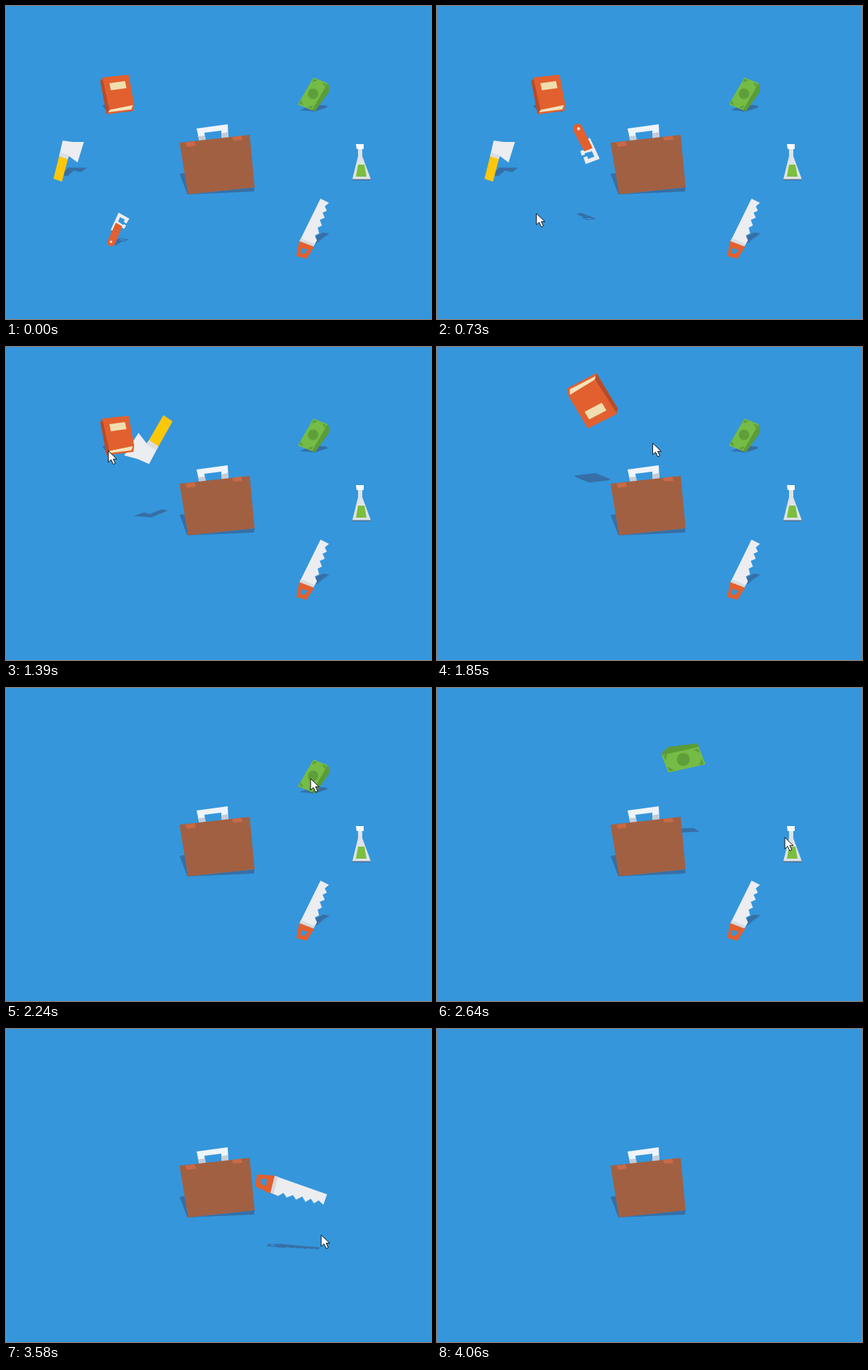
Recreate the animation shown at these times as an HTML page with a canvas. Size 600 px wide and 442 px high, loop 4390 ms.

```html
<!DOCTYPE html>
<html lang="en">
<head>
<meta charset="utf-8">
<title>Packing a briefcase</title>
<style>
html, body { margin: 0; height: 100%; overflow: hidden; background: #3596db; }
canvas { display: block; }
</style>
</head>
<body>
<canvas width="600" height="442"></canvas>
<script>
const ctx = document.querySelector('canvas').getContext('2d');
const LOOP = 4390, FLIGHT = 610, LIFT = 95, GROW = 0.24;
const SHADOW = '#366fa6', WHITE = '#ecedf1', ORANGE = '#e2602f', GREEN = '#75bc46';

const fill = (color, path) => ({ color, path: new Path2D(path) });
const line = (color, width, path) => ({ color, width, path: new Path2D(path) });

// at: centre at rest, ground: shadow centre at rest, tip: where the pointer clicks
const items = [
  { start: 510, at: [157.5, 316], ground: [159, 333], tip: [147, 303], parts: [
    line(WHITE, 4.5, 'M150 317L160 295 171 301 168 306'),
    line(WHITE, 4, 'M157 306L166 312 168 309'),
    fill(ORANGE, 'M155 306L164 311 154 336Q150 342 145 338Q142 335 144 331Z'),
    fill('#f3d9cf', 'M146.5 333a1.8 1.8 0 1 0 3.6 0a1.8 1.8 0 1 0 -3.6 0Z') ] },
  { start: 1060, at: [88, 219], ground: [95, 234], tip: [86, 212], parts: [
    fill('#fdc70c', 'M75 212L88 214 79 248 67 244Z'),
    fill(WHITE, 'M80 190L94 192 110 192 101 221 89 212 87 216 75 212Z'),
    fill('#dcdee4', 'M77 207L89 211 87 216 75 212Z') ] },
  { start: 1580, at: [157, 125], ground: [157, 144.5], tip: [145, 146], parts: [
    fill(ORANGE, 'M145 145L181 138 180 148 142 153Z'),
    fill('#f3e3bb', 'M147 146.5L179 140 177 146 144 150Z'),
    fill('#b94b27', 'M133 106L137 102 146 146 142 153Z'),
    fill(ORANGE, 'M136 101L173 97 181 139 146 146Z'),
    fill('#f0deae', 'M146 109L168 106 170 116 148 119Z') ] },
  { start: 2256, at: [434, 125], ground: [434, 144], tip: [430, 128], parts: [
    fill('#5c9c38', 'M452 108L456 112 456 121 436 149 430 146Z'),
    fill(GREEN, 'M434 101L454 109 432 147 412 139Z'),
    fill('#5f9f3a', 'M434 103L440 105 432 108Z M452 110L451 115 446 108Z M414 138L416 133 420 140Z M431 145L426 143 434 140Z'),
    fill('#5f9f3a', 'M426 124a7.5 7.5 0 1 0 15 0a7.5 7.5 0 1 0 -15 0Z') ] },
  { start: 2850, at: [502, 221], ground: [502, 241], tip: [491, 211], parts: [
    fill('#52708f', 'M489 243H515V246H489Z'),
    fill('#dfe3e8', 'M497 200H503V212L515 244.5H489L497 212Z'),
    fill('#fafbfc', 'M494 195H505V202H495Z'),
    fill('#7cbe3e', 'M497 224H506L509 241H494Z') ] },
  { start: 3440, at: [433, 315], ground: [438, 329], tip: [445, 291], parts: [
    fill(WHITE, 'M444 272L456 278 450 283 453 289 447 292 450 299 443 302 446 310 440 313 442 321 436 324 439 331 433 341 414 333Z'),
    fill('#d8dade', 'M416 328L436 336 433 341 414 333Z'),
    fill(ORANGE, 'M414 332L435 340 424 357 410 353Z M417 342L416 349 421 350 426 344Z') ] }
];

const briefcase = [
  fill(SHADOW, 'M245 237L252 236 264 266 256 266Z M257 266L351 256 350 262Z'),
  fill('#eef4fb', 'M269 173L313 167 314 187 304 188 304 176 280 179 282 191 273 191Z'),
  fill('#c4ccd6', 'M271 184L281 183 282 191 273 191Z M304 180L313 178 314 187 304 188Z'),
  fill('#a26042', 'M245 193L344 182 351 256 257 266Z'),
  fill('#c96a47', 'M253 193L266 191 268 197 256 199Z M319 185L332 183 334 189 321 190Z')
];
const arrow = new Path2D('M0 0V16L4 12.5 7 19 10 17.6 7 11.5H12Z');

const mix = (a, b, k) => a + (b - a) * k;
const mixPoint = (a, b, k) => [mix(a[0], b[0], k), mix(a[1], b[1], k)];
const clamp = k => Math.max(0, Math.min(1, k));
const smooth = k => k * k * (3 - 2 * k);

function paint(parts, tint) {
  for (const { color, width, path } of parts) {
    ctx.fillStyle = ctx.strokeStyle = tint || color;
    if (width) {
      ctx.lineWidth = width;
      ctx.stroke(path);
    } else ctx.fill(path, 'evenodd');
  }
}

function place(item, [x, y], angle, sx, sy, tint) {
  ctx.save();
  ctx.translate(x, y);
  ctx.scale(sx, sy);
  ctx.rotate(angle);
  ctx.translate(-item.at[0], -item.at[1]);
  paint(item.parts, tint);
  ctx.restore();
}

// The pointer leaves each item shortly after its click and glides to the next.
function pointerAt(t) {
  const stops = items.map(i => ({ leave: i.start + 190, tip: i.tip }));
  let spot = mixPoint([160, 446], stops[0].tip, smooth(clamp((t - 90) / 360)));
  stops.forEach(({ leave, tip }, i) => {
    if (t < leave) return;
    const next = stops[i + 1] ? stops[i + 1].tip : [488, -22];
    spot = mixPoint(tip, next, smooth(clamp((t - leave) / 150)));
  });
  return spot;
}

function draw(t) {
  ctx.fillStyle = '#3596db';
  ctx.fillRect(0, 0, 600, 442);

  const flying = items
    .map(item => ({ item, p: clamp((t - item.start) / FLIGHT) }))
    .filter(f => f.p < 1);
  for (const { item, p } of flying)
    place(item, mixPoint(item.ground, [298, 235], p), p * 2 * Math.PI, 0.88, 0.21, SHADOW);
  for (const { item, p } of flying) {
    const arc = 4 * p * (1 - p), size = 1 + GROW * arc;
    const [x, y] = mixPoint(item.at, [298, 225], p);
    place(item, [x, y - LIFT * arc], p * 2 * Math.PI, size, size);
  }
  paint(briefcase);

  ctx.save();
  ctx.translate(...pointerAt(t));
  ctx.fillStyle = '#fff';
  ctx.strokeStyle = '#111';
  ctx.lineWidth = 1;
  ctx.fill(arrow);
  ctx.stroke(arrow);
  ctx.restore();
}

const begin = performance.now();
function tick() {
  draw((performance.now() - begin) % LOOP);
  requestAnimationFrame(tick);
}
tick();
</script>
</body>
</html>
```
